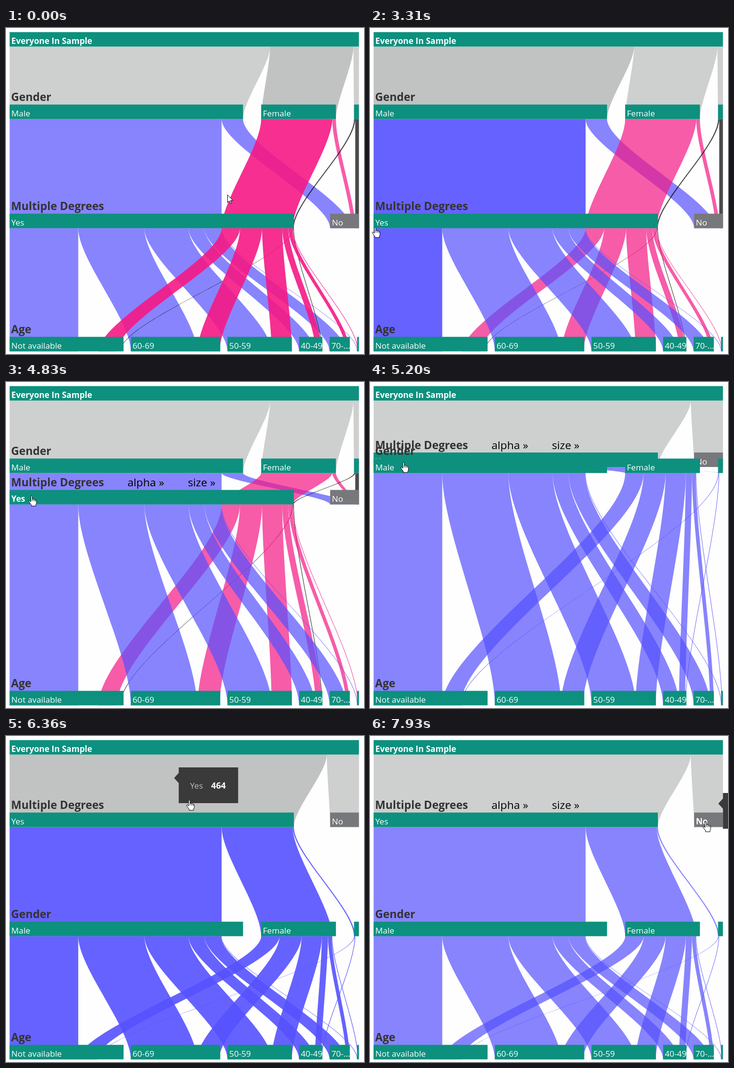
Recreate the animation shown at these times as an HTML page. Size 741x675 px, loop 8 s.

```html
<!DOCTYPE html>
<html lang="en">
<head>
<meta charset="utf-8">
<title>Parallel sets</title>
<style>
  html, body { margin: 0; width: 100%; height: 100%; overflow: hidden; background: #fefefe; }
  svg { display: block; width: 741px; height: 675px; font-family: "Open Sans", "Noto Sans", sans-serif; }
  .cat { font-size: 17.2px; fill: #fff; }
  .bold { font-size: 17.1px; font-weight: 700; }
  .title { font-size: 22.8px; font-weight: 700; fill: #333; }
  .sort { font-size: 22.7px; fill: #000; }
</style>
</head>
<body>
<svg id="stage" viewBox="0 0 741 675"></svg>
<script>
const LOOP = 8000, LEFT = 7.5, WIDTH = 723, GAP = 75, BAR = 30, TOP = 38.5, BOTTOM = 669.5;
const BLUE = "#5652ff", PINK = "#f51985", GREY = "#bbbdbc", TEAL = "#0d907e";

// People per gender, degree answer and age group
const counts = {
  MY: [112, 108, 72, 26, 27, 1], MN: [33, 1, 0, 1, 0, 0],
  FY: [30, 36, 33, 10, 6, 1],    FN: [5, 1, 0, 0, 0, 0],
  UY: [1, 0, 0, 1, 0, 0],        UN: [5, 0, 0, 0, 0, 1]
};
const dims = {
  gender: { title: "Gender", codes: "MFU", names: ["Male", "Female", ""] },
  degree: { title: "Multiple Degrees", codes: "YN", names: ["Yes", "No"] },
  age: { title: "Age", codes: "012345", names: ["Not available", "60-69", "50-59", "40-49", "70-...", ""] }
};
const tint = { M: BLUE, F: PINK, U: "#000", Y: BLUE, N: BLUE };

// Number of people matching every code in the path
function count(path) {
  let sum = 0;
  for (const key in counts)
    counts[key].forEach((n, age) => {
      if ([...path].every(c => (key + age).includes(c))) sum += n;
    });
  return sum;
}
const total = count("");
const unit = (WIDTH - GAP) / total;

for (const dim of Object.values(dims)) {
  let x = LEFT;
  dim.cats = [...dim.codes].map((code, i) => {
    const cat = { code, x, w: count(code) * unit, name: dim.names[i] };
    x += cat.w + GAP / (dim.codes.length - 1);
    return cat;
  });
}

// Ribbons for one order of the dimensions, level by level
function build(order) {
  const ribbons = [], used = {};
  (function walk(path, x, scale) {
    const depth = path.length;
    if (depth === order.length) return;
    for (const cat of dims[order[depth]].cats) {
      const next = path + cat.code, n = count(next);
      if (!n) continue;
      const tx = cat.x + (used[cat.code] || 0);
      used[cat.code] = (used[cat.code] || 0) + n * unit;
      if (!path.includes("N"))
        ribbons.push({ path: next, depth, sx: x, sw: n * scale, tx, tw: n * unit });
      walk(next, tx, unit);
      x += n * scale;
    }
  })("", LEFT, WIDTH / total);
  return ribbons.sort((a, b) => a.depth - b.depth);
}
const SWAP = 5190;
const before = ["gender", "degree", "age"], after = ["degree", "gender", "age"];
const layouts = [before, after].map(order => ({ order, ribbons: build(order) }));

// Hovered ribbon (string) or category (pattern) from each time on
const hovers = [
  [0, "FY"], [1980, "FY4"], [2180, "FY3"], [2380, "FY2"],
  [2580, "MY5"], [2580, "MY4"], [2580, "MY3"], [2940, "MY2"], [3130, "MY1"], [3310, "MY0"],
  [4510, /Y./], [4700, null], [5600, /Y./], [6360, "Y"], [6770, "N"], [7730, /N./]
];
function isActive(path, key) {
  if (!key) return false;
  if (key instanceof RegExp) return key.test(path);
  return path.startsWith(key) || key.startsWith(path);
}

const ticks = [0, 1010, 1210, 1370, 1980, 2180, 2380, 2580, 2940, 3130, 3310, 3510, 3710, 3910, 4110,
  4510, 4700, 4830, 5000, 5200, 5400, 5600, 5760, 5960, 6160, 6360, 6560, 6770, 6960, 7150, 7350, 7540, 7730, 7930];

const pointer = [
  [0, 458, 345], [1010, 467, 310], [1370, 439, 275], [1980, 570, 480], [2380, 479.5, 511.5],
  [2580, 430, 525], [2940, 300, 525], [3310, 11, 412.5], [3910, 35, 340], [4110, 35, 347],
  [4510, 45, 405], [4830, 53.5, 235.5], [5200, 70, 166], [5600, 76.5, 147.5], [5760, 90, 147],
  [6160, 270, 143], [6360, 380, 132.5], [6560, 610, 118], [6770, 690, 112], [7350, 705, 130],
  [7730, 687, 171], [7930, 695.5, 177]
];
const drag = [[4510, 414.5], [4700, 345], [4830, 253.5], [5000, 205], [5200, 176], [5400, 162], [5600, 157.5]];
const tips = [[6360, 348, 87], [6560, 630, 87], [6770, 715, 87], [7350, 717, 100], [7730, 717, 140], [7930, 721, 140]];

function along(keys, t) {
  let i = keys.findIndex(k => k[0] > t);
  if (i < 0) return keys[keys.length - 1].slice(1);
  if (!i) return keys[0].slice(1);
  const a = keys[i - 1], b = keys[i], f = (t - a[0]) / (b[0] - a[0]);
  return a.slice(1).map((v, k) => v + (b[k + 1] - v) * f);
}
function ease(t, start, from, to) {
  const u = Math.min(1, Math.max(0, (t - start) / 500));
  return from + (to - from) * (u < .5 ? 4 * u ** 3 : 1 - 4 * (1 - u) ** 3);
}

const text = (x, y, cls, str, extra = "") => `<text x="${x}" y="${y}" class="${cls}" ${extra}>${str}</text>`;
const bar = (x, y, w, fill) => `<rect x="${x}" y="${y - BAR}" width="${w}" height="${BAR}" fill="${fill}"/>`;

function ribbon(r, y0, y1, active) {
  const bend = (y1 - y0) / 4, a = y0 + bend, b = y1 - bend;
  const sr = r.sx + r.sw, tr = r.tx + r.tw;
  const d = `M${r.sx} ${y0}C${r.sx} ${a} ${r.tx} ${b} ${r.tx} ${y1}H${tr}C${tr} ${b} ${sr} ${a} ${sr} ${y0}Z`;
  return `<path d="${d}" fill="${r.depth ? tint[r.path[0]] : GREY}" fill-opacity="${active ? .9 : .7}"/>`;
}

function dimension(dim, y, hot) {
  let out = text(10.5, y - 37.5, "title", dim.title);
  if (hot && dim.codes.includes(hot))
    out += text(251.5, y - 37.5, "sort", "alpha »") + text(376.5, y - 37.5, "sort", "size »");
  for (const c of dim.cats)
    out += bar(c.x, y, c.w, c.code === "N" ? "#77787b" : TEAL) +
      text(c.x + 3.6, y - 5.5, c.code === hot ? "cat bold" : "cat", c.name);
  return out;
}

function tooltip(t) {
  if (t < tips[0][0]) return "";
  const [x, y] = along(tips, t), left = x + 9.5, no = t >= 6770;
  return `<path d="M${x} ${y}l9.5 -10.5v-11.5h123v74h-123v-41.5Z" fill="#3a3a3a"/>` +
    text(left + 23.5, y + 21.5, "cat", no ? "No" : "Yes", 'style="fill:#bdbdbd"') +
    text(left + 67, y + 21.5, "cat bold", no ? count("N") : count("Y"), 'style="font-size:17.8px"');
}

const ARROW = "M.5 .5V16.5L4.2 13L6.8 18.8L9 17.8L6.5 12.1H11.8Z";
const HAND = "M-2 2Q-2 0-.5 0T1 2V7Q3.5 5.8 4.2 7.8Q6.6 6.8 7.4 8.8Q9.6 8 9.6 10.5V15Q9.5 17 8.3 18.5V21.3H-1V19Q-3 16.5-6 12Q-6.5 9.5-4.6 10L-2 12.5Z";
function cursor(t) {
  const [x, y] = along(pointer, t);
  const arrow = t < 1980 || (t >= 3910 && t < 4510);
  const knuckles = arrow ? "" : '<path d="M1 7V11M4.2 8V11.5M7.3 9V12" stroke="#000" fill="none"/>';
  return `<g transform="translate(${x} ${y})"><path d="${arrow ? ARROW : HAND}" fill="#fff" stroke="#000"/>${knuckles}</g>`;
}

function draw(t) {
  const { order, ribbons } = layouts[t < SWAP ? 0 : 1];
  const ys = {
    gender: ease(t, SWAP, 188.5, 414.5),
    degree: t < 5600 ? along(drag, t)[0] : ease(t, 5600, 157.5, 188.5),
    age: BOTTOM
  };
  // Each hover lifts its ribbons to the front
  let stack = ribbons, key = null;
  for (const [start, k] of hovers) {
    if (start > t) break;
    key = k;
    stack = [...stack.filter(r => !isActive(r.path, k)), ...stack.filter(r => isActive(r.path, k))];
  }
  const hot = t >= 7730 ? "N" : t >= 4510 && t < 6160 ? "Y" : "";
  let out = "";
  for (const r of stack)
    out += ribbon(r, r.depth ? ys[order[r.depth - 1]] : TOP, ys[order[r.depth]], isActive(r.path, key));
  out += bar(LEFT, TOP, WIDTH, TEAL) + text(LEFT + 3.6, TOP - 5.5, "cat bold", "Everyone In Sample");
  for (const name of order) out += dimension(dims[name], ys[name], hot);
  stage.innerHTML = out + tooltip(t) + cursor(t);
}

const stage = document.getElementById("stage");
const begin = performance.now();
let shown = -1;
function frame() {
  const t = (performance.now() - begin) % LOOP;
  const tick = ticks.filter(k => k <= t).pop();
  if (tick !== shown) draw(shown = tick);
  requestAnimationFrame(frame);
}
frame();
</script>
</body>
</html>
```
